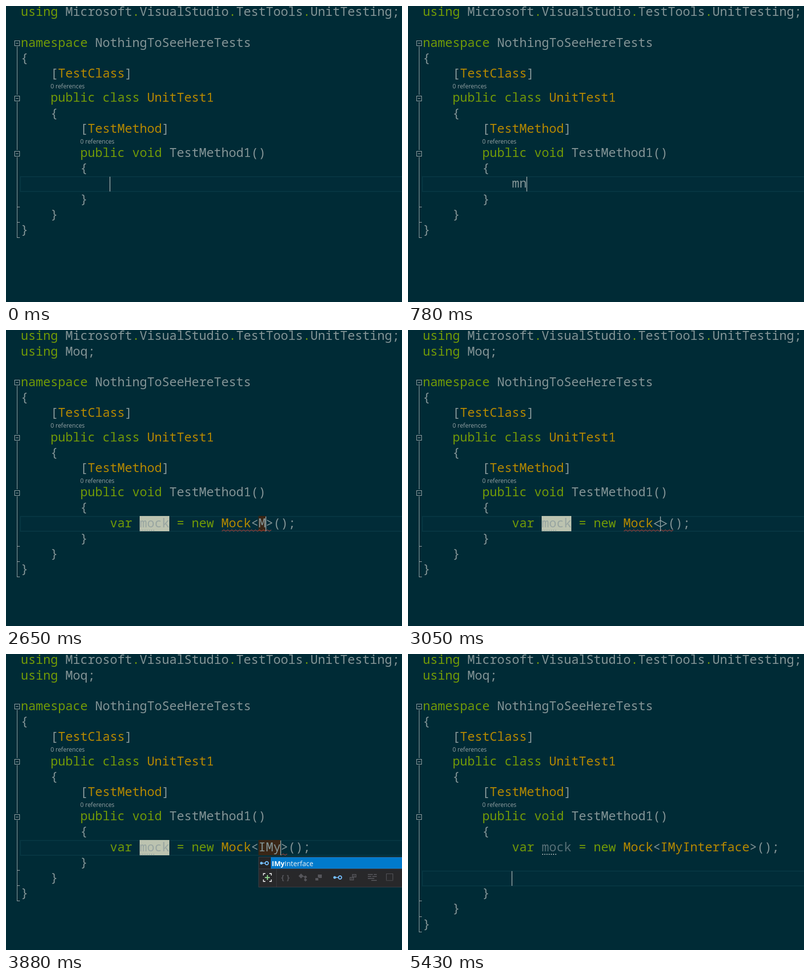
An HTML page with a canvas for the animation above (5510 ms loop, 800 px wide and 600 px high).

```html
<!DOCTYPE html>
<html lang="en">
<head>
<meta charset="utf-8">
<title>Code snippet</title>
<style>
  html, body { margin: 0; width: 100%; height: 100%; overflow: hidden; background: #002b36; }
  canvas { display: block; }
</style>
</head>
<body>
<canvas id="stage" width="800" height="600"></canvas>
<script>
const ctx = document.getElementById('stage').getContext('2d');
const LOOP = 5510, LEFT = 30, COL = 15, LINE = 31.2, LENS = 18, TOP = -2.7;
const CODE = '25px "Noto Sans Mono", "DejaVu Sans Mono", monospace';
const UI = '"Open Sans", "Noto Sans", sans-serif';
const GREY = '#839496', GREEN = '#719a07', GOLD = '#b58900', DIM = '#566f76';
const keywords = new Set('using namespace public class void var new . ='.split(' '));
const types = new Set('TestClass UnitTest1 TestMethod Mock IMyInterface'.split(' '));

const item = s => s.split(':');
const mItems = ['snip:mbox', 'snip:mn', 'snip:mr', 'snip:mra', 'snip:mt', 'snip:mta',
  'method:MemberwiseClone', 'space:Microsoft', 'space:Moq'].map(item);
const iItems = ['iface:IMyInterface', 'enum:InheritanceBehavior', 'class:InternalTestFailureException',
  'struct:InvocationAction', 'struct:InvocationFunc', 'iface:ISetup', 'iface:ISetupList',
  'class:It', 'class:ItExpr'].map(item);
const imItems = ['iface:IMock<>', 'iface:IMocked', 'iface:IMocked<>', 'iface:IMyInterface'].map(item);

const mList = { items: mItems, sel: 1, bold: 1, w: 284, scroll: true };
const mnList = { items: [mItems[1]], sel: 0, bold: 2, w: 284, on: 'snip' };
const iList = { items: iItems, sel: 0, bold: 1, w: 362, scroll: true };
const imList = { items: imItems, sel: 3, bold: 2, w: 362, on: 'iface' };
const imyList = { items: [iItems[0]], sel: 0, bold: 3, w: 362, on: 'iface' };

const mock = type => `var mock = new Mock<${type}>();`;

// Each step changes part of the state at the given time.
const steps = [
  [0, { text: '', caret: 12, row: 10, active: true }],
  [80, { caret: null }],
  [230, { text: 'm', caret: 13 }],
  [380, { list: mList }],
  [460, { text: 'mn', caret: 14, list: mnList }],
  [780, { list: null }],
  [1310, { text: mock(''), caret: 20, row: 11, moq: true, active: false, plain: true,
    mark: '#45443a', wave: [36, 37.15] }],
  [1390, { plain: false }],
  [1770, { caret: 32, active: true, mark: '#bcc3b0' }],
  [1850, { wave: null }],
  [1930, { unused: true }],
  [2010, { wave: [32, 32.9] }],
  [2480, { caret: null }],
  [2650, { text: mock('M'), caret: 33, field: 33, wave: [27, 33.9] }],
  [2710, { list: mList }],
  [3050, { text: mock(''), caret: 32, field: null, list: null }],
  [3110, { wave: null }],
  [3170, { wave: [32, 32.9] }],
  [3330, { text: mock('I'), caret: 33, field: 33, wave: [33, 33.9] }],
  [3400, { list: iList }],
  [3570, { text: mock('IM'), caret: 34, field: 34, wave: [34, 34.9] }],
  [3640, { list: imList }],
  [3800, { text: mock('IMy'), caret: 35, field: 35, wave: [35, 35.9] }],
  [3880, { list: imyList }],
  [4260, { text: mock('IMyInterface'), caret: 44, field: 44, list: null, wave: [44, 44.9], fresh: true }],
  [4430, { wave: [32, 44] }],
  [4580, { caret: 48, mark: null, field: null }],
  [4810, { fresh: false }],
  [4900, { wave: null }],
  [5060, { row: 12, caret: 12, added: 1 }],
  [5430, { row: 13, added: 2 }]
];

const stateAt = t => Object.assign({}, ...steps.filter(s => s[0] <= t).map(s => s[1]));
const colX = c => LEFT + c * COL;

function rect(x, y, w, h, color) {
  ctx.fillStyle = color;
  ctx.fillRect(x, y, w, h);
}

function path(points, color, width, close) {
  ctx.beginPath();
  points.forEach(p => ctx.lineTo(p[0], p[1]));
  if (close) ctx.closePath();
  ctx.lineWidth = width || 1;
  ctx.strokeStyle = ctx.fillStyle = color;
  width ? ctx.stroke() : ctx.fill();
}

function label(str, x, y, font, color) {
  ctx.font = font;
  ctx.fillStyle = color;
  ctx.fillText(str, x, y);
  return ctx.measureText(str).width;
}

function tokenColor(word, s) {
  if (word === 'mock' && s.unused) return s.mark ? '#98a5a1' : DIM;
  if (s.plain && ['var', '=', 'new', 'Mock'].includes(word)) return GREY;
  if (s.fresh && word === 'IMyInterface') return GREY;
  return keywords.has(word) ? GREEN : types.has(word) ? GOLD : GREY;
}

function codeLine(text, top, s) {
  const base = Math.round(top + 23);
  for (const m of text.matchAll(/\w+|<>|[^\s\w]/g)) {
    const x = colX(m.index), y = base - 7.5;
    if (m[0] === '<>') {
      path([[x + 3, y], [x + 15, y - 6.5], [x + 27, y], [x + 15, y + 6.5]], GREY, 1.8, true);
    } else {
      label(m[0], x, base, CODE, tokenColor(m[0], s));
    }
  }
}

function squiggle([from, to], top) {
  const y = Math.round(top) + 29.5, pts = [];
  for (let x = colX(from) + 1; x < colX(to); x += 4) pts.push([x, y + (pts.length % 2 ? -1.4 : 1.4)]);
  path(pts, '#b8453b', 1.1);
}

function ring(x, y, r, color, width) {
  ctx.beginPath();
  ctx.arc(x, y, r, 0, 7);
  ctx.lineWidth = width || 1;
  ctx.strokeStyle = ctx.fillStyle = color;
  width ? ctx.stroke() : ctx.fill();
}

const diamond = (x, y, r, c) => path([[x - r, y], [x, y - r], [x + r, y], [x, y + r]], c, 0, true);

const icons = {
  snip(x, y, c = '#d8d8d8') {
    path([[x - 6.5, y + 5], [x - 6.5, y - 7.5], [x + 6.5, y - 7.5], [x + 6.5, y + 5]], c, 1.2);
    for (let i = 0; i < 7; i++) rect(x - 7 + i * 2.1, y + 5.5, 1.2, 1.5, c);
  },
  method(x, y, c = '#b28be0') {
    const cx = x - 4, cy = y - 3;
    path([[cx - 5, cy - 2], [cx, cy - 5], [cx + 5, cy - 2], [cx + 5, cy + 3], [cx, cy + 6], [cx - 5, cy + 3]], c, 1.2, true);
    path([[cx - 5, cy - 2], [cx, cy + 1], [cx + 5, cy - 2]], c, 1.2);
    path([[cx, cy + 1], [cx, cy + 6]], c, 1.2);
    label('★', x + 2, y + 9, '8px "DejaVu Sans", sans-serif', '#d8d8d8');
  },
  space(x, y, c = '#d8d8d8') {
    label('{', x - 9, y + 5, 'bold 15px ' + UI, c);
    label('}', x + 2, y + 5, 'bold 15px ' + UI, c);
  },
  iface(x, y, c = '#75bfff') {
    ring(x - 6, y, 2.7, c);
    rect(x - 5, y - 0.8, 7, 1.6, c);
    ring(x + 4.8, y, 3.2, c, 2);
  },
  enum(x, y, c = '#e0a868') {
    ctx.lineWidth = 1.6;
    ctx.strokeStyle = c;
    ctx.strokeRect(x - 2, y - 6, 7, 5);
    ctx.strokeRect(x - 7, y, 7, 5);
    rect(x, y - 4, 3, 1.2, c);
    rect(x - 5, y + 2, 3, 1.2, c);
  },
  class(x, y, c = '#e0a868') {
    diamond(x - 4, y - 3, 5, c);
    path([[x - 2, y - 2], [x + 4, y - 2], [x + 4, y + 5]], c, 1.4);
    diamond(x + 5, y - 1, 3.3, c);
    diamond(x + 5, y + 5, 3.3, c);
  },
  struct(x, y, c = '#61b0f5') {
    rect(x - 2, y - 6, 8, 7, c);
    rect(x - 7, y, 7, 5, '#252526');
    rect(x - 7, y + 1, 6, 5, c);
  },
  keyword(x, y, c) {
    [[-9, 10], [3, 6], [-9, 7], [0, 9], [-9, 13], [-9, 5], [-2, 11]].forEach(([dx, w], i) =>
      rect(x + dx, y - 7 + Math.floor(i / 2) * 4, w, 1.8, c));
  }
};

function filterBar(x, y, w, on) {
  rect(x, y, w, 38, '#3f3f46');
  rect(x + 1, y + 1, w - 2, 36, '#28282a');
  rect(x + 36, y + 1, 1, 36, '#3a3a3e');
  const cx = x + 18, cy = y + 18;
  for (const a of [-1, 1]) for (const b of [-1, 1]) {
    path([[cx + a * 8, cy + b * 4], [cx + a * 8, cy + b * 8], [cx + a * 4, cy + b * 8]], '#d8d8d8', 1.8);
  }
  rect(cx - 5, cy - 1, 10, 2.2, '#8dd28a');
  rect(cx - 1, cy - 5, 2.2, 10, '#8dd28a');
  const kinds = { space: 55, class: 90, struct: 122, iface: 160, enum: 192, keyword: 230, snip: 265 };
  for (const k in kinds) icons[k](x + kinds[k], cy, k === on ? undefined : '#55555a');
}

function popup(list, x, y) {
  const { items, w } = list, h = items.length * 24, right = list.scroll ? 22 : 1;
  ctx.save();
  ctx.beginPath();
  ctx.rect(x, y, w, h + 40);
  ctx.clip();
  rect(x, y, w, h + 2, '#3f3f46');
  rect(x + 1, y + 1, w - 2, h, '#252526');
  items.forEach(([kind, name], i) => {
    const top = y + 1 + i * 24;
    if (i === list.sel) rect(x + 25, top, w - 25 - right, 24, '#007acc');
    icons[kind](x + 12, top + 12);
    const dx = label(name.slice(0, list.bold), x + 27, top + 18, 'bold 14px ' + UI, '#fff');
    label(name.slice(list.bold), x + 27 + dx, top + 18, '14px ' + UI, '#f1f1f1');
  });
  if (list.scroll) {
    const sx = x + w - 22, mx = sx + 10.5;
    rect(sx, y + 1, 21, h, '#3e3e42');
    path([[mx - 5.5, y + 15], [mx, y + 9], [mx + 5.5, y + 15]], '#999', 0, true);
    rect(sx + 5, y + 22, 11, 10, '#686868');
    path([[mx - 5.5, y + h - 14], [mx, y + h - 8], [mx + 5.5, y + h - 14]], '#999', 0, true);
  }
  filterBar(x, y + h, w, list.on);
  ctx.restore();
}

function outline(starts, ends) {
  const c = '#a5adae';
  const last = Math.round(ends[2]) - 1;
  rect(22, starts[0], 1, last - starts[0] + 1, c);
  ends.forEach(y => rect(22, Math.round(y) - 1, 6, 1, c));
  starts.forEach(y => {
    rect(17, y - 7, 11, 14, '#002b36');
    ctx.lineWidth = 1;
    ctx.strokeStyle = c;
    ctx.strokeRect(17.5, y - 4.5, 10, 10);
    rect(20, y, 5, 1, c);
  });
}

function draw(t) {
  const s = stateAt(t);
  rect(0, 0, 800, 600, '#002b36');

  const lines = [
    'using Microsoft.VisualStudio.TestTools.UnitTesting;',
    ...(s.moq ? ['using Moq;'] : []),
    '', 'namespace NothingToSeeHereTests', '{',
    '    [TestClass]', '    public class UnitTest1', '    {',
    '        [TestMethod]', '        public void TestMethod1()', '        {',
    ' '.repeat(12) + s.text, ...Array(s.added || 0).fill(''),
    '        }', '    }', '}'
  ];
  let lens = 0;
  const tops = lines.map((text, i) => {
    if (text.includes('public')) lens += LENS;
    return TOP + i * LINE + lens;
  });
  const edit = tops[s.moq ? 11 : 10], cur = tops[s.row];
  const ey = Math.round(edit), cy = Math.round(cur);

  if (s.active) {
    rect(28, cy, 772, 32, '#073642');
    rect(30, cy + 2, 770, 28, '#012c38');
  }
  if (s.mark) rect(colX(16), ey, 60, 31, s.mark);
  if (s.field) rect(colX(32), ey, (s.field - 32) * COL, 31, '#392616');

  lines.forEach((text, i) => {
    codeLine(text, tops[i], s);
    if (text.includes('public')) {
      label('0 references', colX(text.search(/\S/)), Math.round(tops[i] - 4.3), '12px ' + UI, '#94a1a3');
    }
  });

  if (s.unused) {
    for (let i = 0; i < 7; i++) rect(271 + i * 4.4, ey + 28, 2, 2, s.mark ? '#98a5a1' : '#a9b4b4');
  }
  if (s.wave) squiggle(s.wave, edit);

  const folds = tops.filter((_, i) => /namespace|public/.test(lines[i])).map(y => Math.round(y + 15.6));
  outline(folds, tops.slice(-3).map(y => y + LINE));

  if (s.caret) rect(colX(s.caret) - 0.8, cy + 1, 1.6, 30, '#93a1a1');
  if (s.list) popup(s.list, colX(s.moq ? 32 : 12), Math.round(edit + LINE + 2.9));
}

function tick() {
  draw(performance.now() % LOOP);
  requestAnimationFrame(tick);
}
tick();
</script>
</body>
</html>
```
